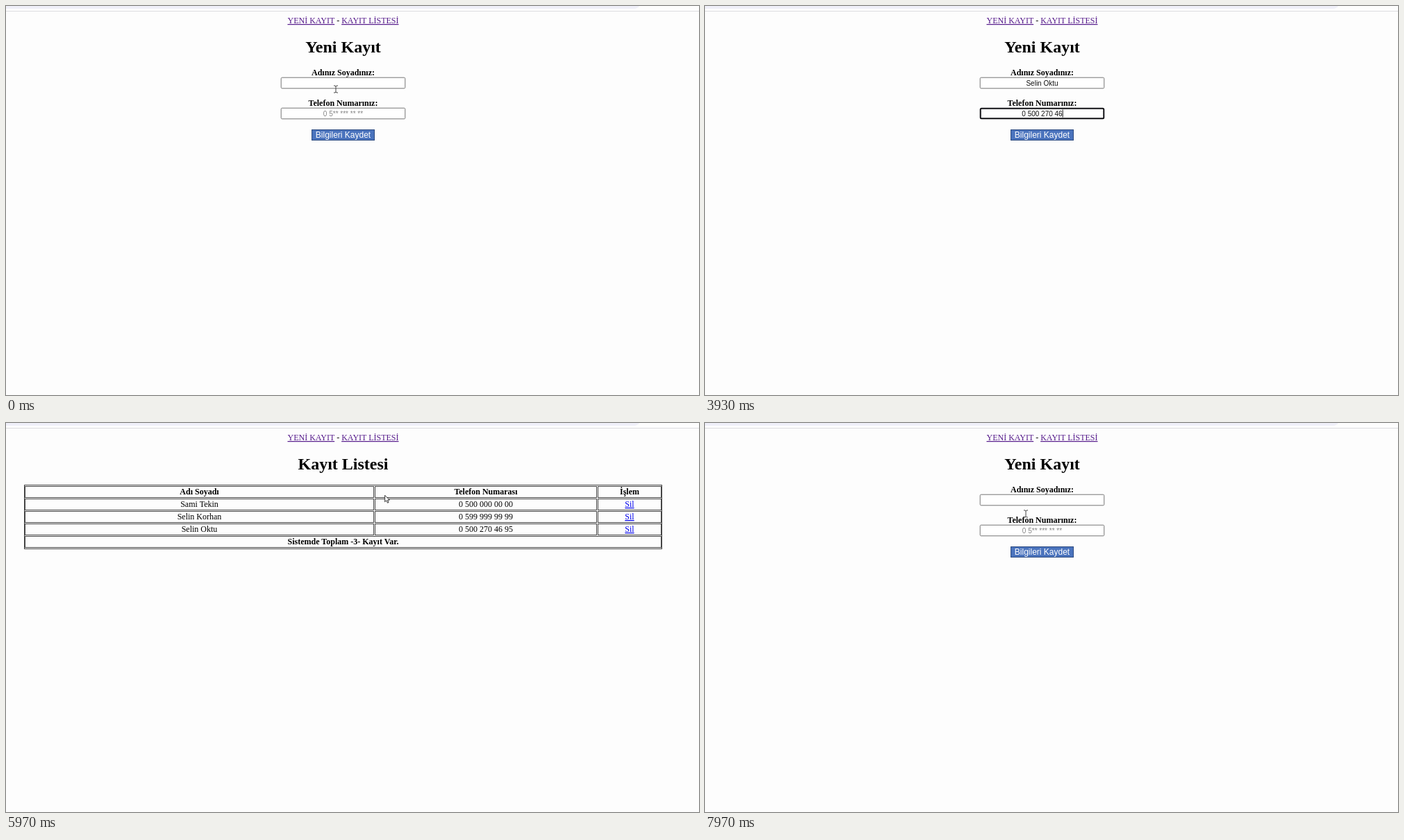
An HTML page that plays this animation: 998 px wide and 561 px high, repeating every 8000 ms.

```html
<!DOCTYPE html>
<html lang="tr">
<head>
<meta charset="utf-8">
<style>
html, body { margin: 0; width: 100%; height: 100%; overflow: hidden; background: #fdfdfd; }
svg { display: block; width: 998px; height: 561px; }
text { white-space: pre; text-anchor: middle; font: 12px "Liberation Serif", serif; }
.b { font-weight: bold; }
.h { font-size: 24px; font-weight: bold; }
.in { font: 10px "Liberation Sans", sans-serif; }
.link { text-decoration: underline; fill: #551a8b; }
.new { fill: #0000ee; }
.ui { font-family: "Open Sans", sans-serif; text-anchor: start; fill: #222; }
.cell { fill: none; stroke: #444; }
</style>
</head>
<body>
<svg viewBox="0 0 998 561">
  <path d="M0 0H912Q909 4 904 4H0Z" fill="#f0f0f9"/>
  <rect y="7" width="998" height="1" fill="#dcdce0"/>

  <g id="nav">
    <text x="485.5" y="25"><tspan class="link">YENİ KAYIT</tspan> - <tspan class="link">KAYIT LİSTESİ</tspan></text>
  </g>

  <g id="form">
    <text class="h" x="485.5" y="67">Yeni Kayıt</text>
    <text class="b" x="485.5" y="100">Adınız Soyadınız:</text>
    <text class="b" x="485.5" y="144">Telefon Numarınız:</text>
    <g id="name"></g>
    <g id="phone"></g>
    <rect x="440.5" y="178.5" width="90" height="15" fill="#4a73bd" stroke="#2c4a80"/>
    <text class="in" style="font-size:12px" x="485.5" y="190" fill="#fff">Bilgileri Kaydet</text>
  </g>

  <g id="list">
    <text class="h" x="485.5" y="67">Kayıt Listesi</text>
    <rect class="cell" x="26.5" y="89.5" width="918" height="92"/>
    <g id="rows"></g>
  </g>

  <g id="alert">
    <rect x="316" y="5" width="339" height="98.5" rx="4" fill="#fdfdfd" stroke="#b4b4ba"
      style="filter:drop-shadow(0 1px 1.5px #0006)"/>
    <text class="ui" style="font-size:10.65px" x="328" y="30">localhost web sitesinin mesajı</text>
    <text class="ui" style="font-size:9.2px" x="328" y="51.5">Kayıt Başarılı!</text>
    <rect x="588.5" y="67.5" width="54" height="23.5" rx="3" fill="#fff" stroke="#2a73d6" stroke-width="1.6"/>
    <rect x="590" y="69" width="51" height="20.5" rx="1.5" fill="#2a73d6"/>
    <text class="ui" style="font-size:8.2px;font-weight:600;fill:#fff" x="600.5" y="82">Tamam</text>
  </g>

  <g id="mouse">
    <path id="beam" d="M-3 -5H-1L0 -4L1 -5H3M0 -4V4M-3 5H-1L0 4L1 5H3" fill="none" stroke="#444"/>
    <path id="arrow" d="M0 0V9.5L2.2 7.5L3.8 11L5.4 10.3L3.9 6.9H6.8Z" fill="#fff" stroke="#222" stroke-width=".9"/>
    <path id="hand" d="M-1 0Q0 -1 1 0V4L5 5Q6 5 6 7L5 12H0L-4 7Q-4 5 -2 6L-1 7Z" fill="#fff" stroke="#222" stroke-width=".9"/>
  </g>
</svg>
<script>
const $ = id => document.getElementById(id);
const show = (el, on) => { el.style.display = on ? '' : 'none'; };
const MID = 485.5, LOOP = 8000;
const FOCUS = 400, TAB = 2200, SUBMIT = 5050, CLOSED = 5850, LIST = 5900, BACK = 7900;
const NAME = 'Selin Oktu', PHONE = '0 500 270 46 95';

// Time of each key press
const nameKeys = [...NAME].map((_, i) => i < 8 ? 900 + i * 90 : 1720 + (i - 8) * 110);
const phoneKeys = [...PHONE].map((_, i) => i < 12 ? 2550 + i * 120 : 4010 + (i - 12) * 200);

// Pointer path: time, x, y, shape
const path = [
  [0, 475, 120, 'beam'], [300, 474, 113, 'beam'], [880, 474, 113, ''],
  [4570, 474, 113, 'beam'], [4750, 482, 170, 'arrow'], [4850, 484, 186, 'arrow'],
  [5050, 484, 186, 'arrow'], [5400, 556, 98, 'arrow'], [5570, 582, 78, 'arrow'],
  [5720, 612, 80, 'arrow'], [5850, 612, 80, 'arrow'], [6200, 420, 150, 'arrow'],
  [6400, 270, 159, 'beam'], [6530, 289, 158, 'beam'], [6800, 300, 157, 'beam'],
  [7050, 300, 157, 'arrow'], [7500, 440, 66, 'beam'], [7630, 447, 50, 'beam'],
  [7750, 441, 20, 'hand'], [7870, 441, 20, 'arrow'], [7970, 462, 131, 'beam'],
  [8000, 463, 129, 'beam']
];

const cols = [[27.5, 529.5], [531.5, 850.5], [852.5, 943.5]];
const rows = [
  ['Adı Soyadı', 'Telefon Numarası', 'İşlem'],
  ['Sami Tekin', '0 500 000 00 00', 'Sil'],
  ['Selin Korhan', '0 599 999 99 99', 'Sil'],
  [NAME, PHONE, 'Sil'],
  ['Sistemde Toplam -3- Kayıt Var.']
];
$('rows').innerHTML = rows.map((row, r) => row.map((label, c) => {
  const [x1, x2] = row.length > 1 ? cols[c] : [27.5, 943.5];
  const y = 91.5 + 18.1 * r;
  const style = r % 4 === 0 ? 'b' : c === 2 ? 'link new' : '';
  return `<rect class="cell" x="${x1}" y="${Math.floor(y) + .5}" width="${x2 - x1}" height="16"/>
    <text class="${style}" x="${(x1 + x2) / 2}" y="${Math.round(y + 11.5)}">${label}</text>`;
}).join('')).join('');

function makeField(id, y, value, keys, hint) {
  $(id).innerHTML = `<rect fill="#fff" rx="1.5"/><text class="in" x="${MID}" y="${y + 11.5}"></text>
    <rect y="${y + 2.5}" width="1" height="11" fill="#111"/>`;
  const [box, label, caret] = $(id).children;
  return (t, from, to) => {
    const focused = t >= from && t < to;
    const pad = focused ? 1 : .5;
    const set = { x: 395.7 + pad, y: y - .3 + pad, width: 179.6 - 2 * pad, height: 16.6 - 2 * pad,
      stroke: focused ? '#101014' : '#767676', 'stroke-width': 2 * pad };
    for (const k in set) box.setAttribute(k, set[k]);
    const pressed = keys.filter(k => k <= t);
    const typed = t < BACK ? value.slice(0, pressed.length) : '';
    label.textContent = typed || hint;
    label.setAttribute('fill', typed ? '#111' : '#858585');
    const last = pressed.length ? pressed[pressed.length - 1] : from;
    show(caret, focused && (t - last) % 1000 < 500);
    caret.setAttribute('x', MID + (typed ? label.getComputedTextLength() / 2 : 0));
  };
}
const drawName = makeField('name', 103, NAME, nameKeys, '');
const drawPhone = makeField('phone', 147, PHONE, phoneKeys, '0 5** *** ** **');

function drawMouse(t) {
  const i = path.findIndex(p => p[0] > t);
  const [t0, x0, y0, shape] = path[i - 1], [t1, x1, y1] = path[i];
  const k = (t - t0) / (t1 - t0);
  $('mouse').setAttribute('transform', `translate(${x0 + (x1 - x0) * k} ${y0 + (y1 - y0) * k})`);
  for (const s of ['beam', 'arrow', 'hand']) show($(s), s === shape);
}

function draw(now) {
  const t = now % LOOP;
  const form = t < SUBMIT || t >= BACK, list = t >= LIST && t < BACK;
  show($('form'), form);
  show($('list'), list);
  show($('nav'), form || list);
  show($('alert'), t >= SUBMIT && t < CLOSED);
  if (form) {
    drawName(t, FOCUS, TAB);
    drawPhone(t, TAB, SUBMIT);
  }
  drawMouse(t);
}

const start = performance.now();
function tick() {
  draw(performance.now() - start);
  requestAnimationFrame(tick);
}
tick();
</script>
</body>
</html>
```
